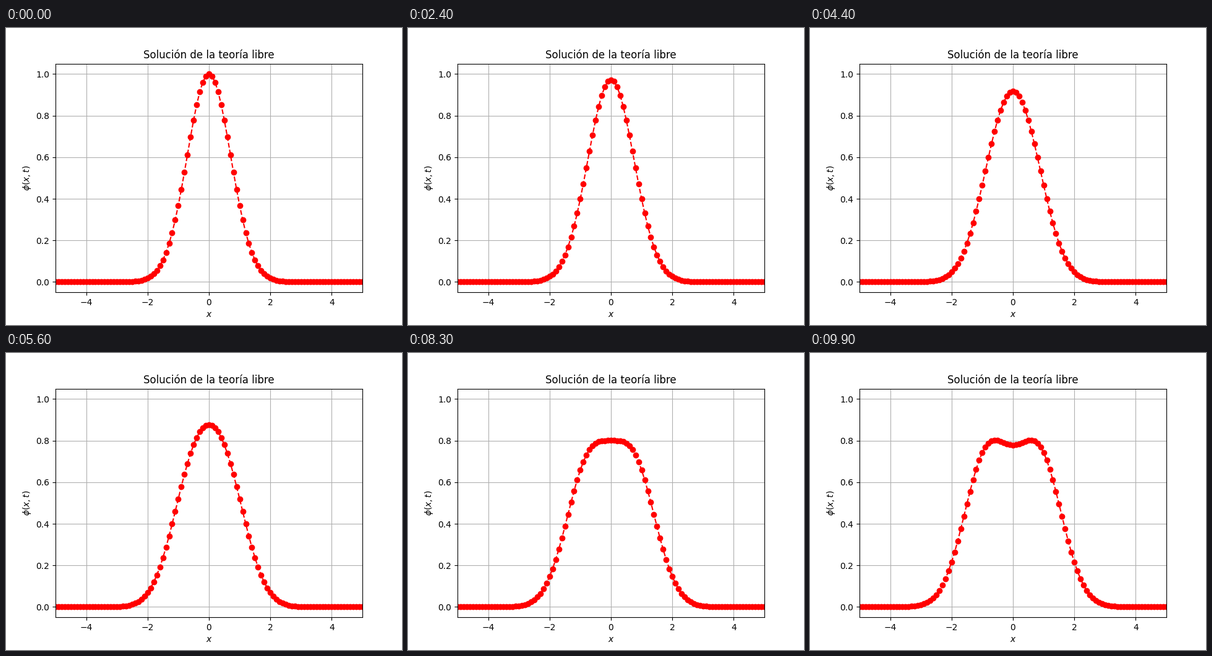
A matplotlib script for the animation above (10 s loop, 640 by 480 pixels).

```python
import numpy as np
import matplotlib.pyplot as plt
from matplotlib.animation import FuncAnimation

FRAMES = 100
DX, DT = 0.1, 0.01
x = np.linspace(-5, 5, 101)


def accel(phi):
    """Right-hand side of phi_tt = phi_xx + phi, with fixed ends."""
    a = np.zeros_like(phi)
    a[1:-1] = (phi[2:] - 2 * phi[1:-1] + phi[:-2]) / DX**2 + phi[1:-1]
    return a


def solve():
    """Leapfrog evolution of a Gaussian released at rest."""
    phi = np.zeros((FRAMES, x.size))
    phi[0] = np.exp(-x**2)
    phi[1] = phi[0] + 0.5 * DT**2 * accel(phi[0])
    for n in range(1, FRAMES - 1):
        phi[n + 1] = 2 * phi[n] - phi[n - 1] + DT**2 * accel(phi[n])
    return phi


phi = solve()

fig, ax = plt.subplots(figsize=(6.4, 4.8), dpi=100)
line, = ax.plot(x, phi[0], "ro--")
ax.set_xlim(-5, 5)
ax.set_ylim(-0.05, 1.05)
ax.set_title("Solución de la teoría libre")
ax.set_xlabel("$x$")
ax.set_ylabel(r"$\phi(x,t)$")
ax.grid(True)


def update(n):
    line.set_ydata(phi[n])
    return line,


anim = FuncAnimation(fig, update, frames=FRAMES, interval=100, repeat=True)
plt.show()
```
